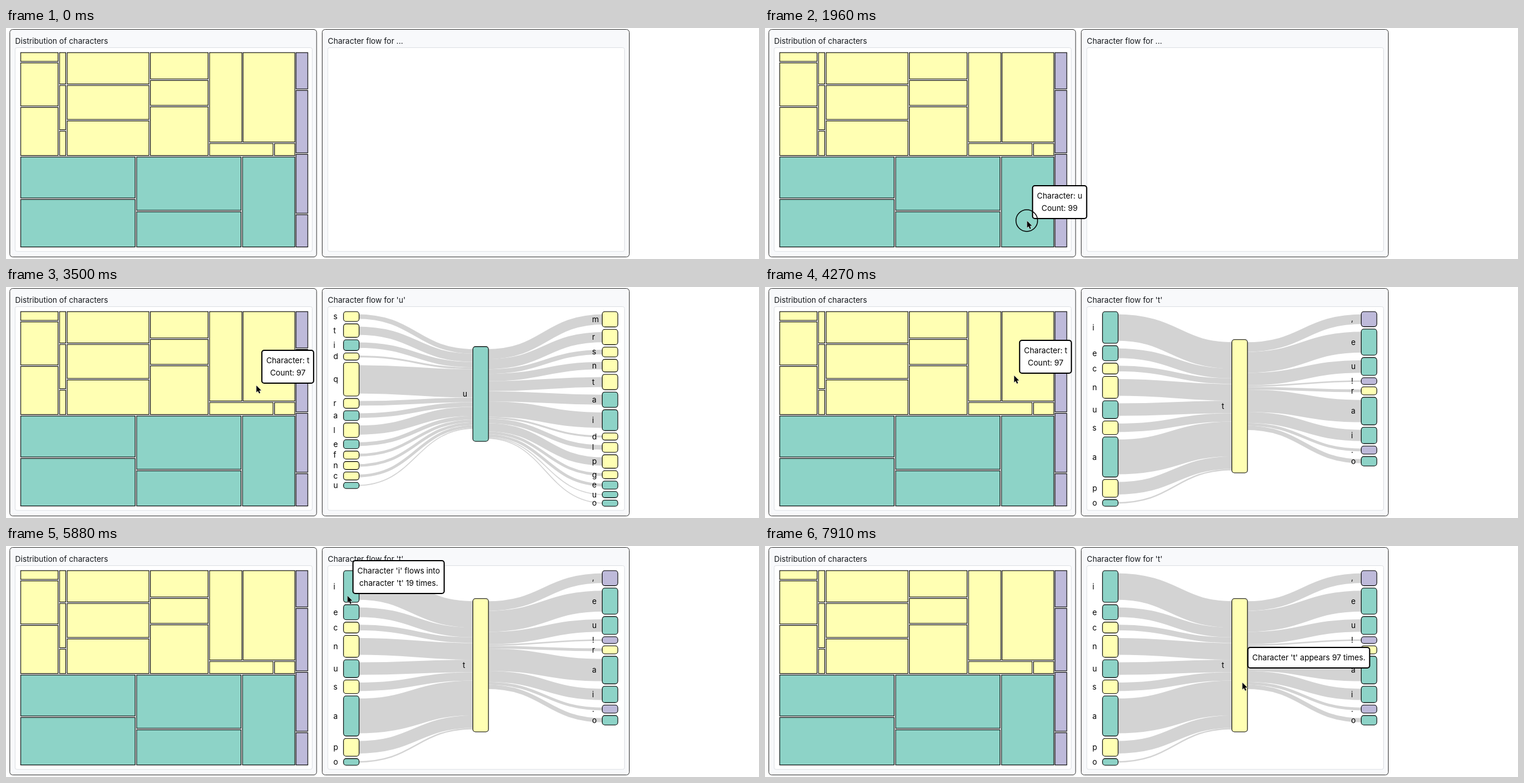
An HTML page that plays this animation: 1280x394 px, repeating every 8 s.

```html
<!DOCTYPE html>
<html lang="en">
<head>
<meta charset="utf-8">
<title>Character flow</title>
<style>
  html, body { margin: 0; width: 100%; height: 100%; overflow: hidden; background: #fff; }
  body { position: relative; font: 13.2px/21px Inter, Roboto, sans-serif; color: #000; }
  svg { position: absolute; left: 0; top: 0; width: 1280px; height: 394px; }
  .panel { fill: #f8f9fb; stroke: #333; }
  .plot { fill: #fff; stroke: #dcdfe3; }
  .title { fill: #15181c; }
  .cell, .node { stroke: #000; stroke-width: 1.1; }
  .link { fill: none; stroke: #d3d3d3; }
  #tip {
    position: absolute; left: 0; top: 0; padding: 6px 6.5px;
    border: 2px solid #000; border-radius: 5px; background: #fff;
    text-align: center; white-space: pre;
  }
</style>
</head>
<body>
<svg id="chart">
  <rect class="panel" x="6.5" y="2.5" width="521.5" height="388" rx="5"/>
  <rect class="plot" x="15.5" y="33.5" width="505" height="347.5" rx="3"/>
  <text class="title" x="15.5" y="27.3">Distribution of characters</text>
  <rect class="panel" x="537.5" y="2.5" width="522" height="388" rx="5"/>
  <rect class="plot" x="547" y="33.5" width="504.5" height="347.5" rx="3"/>
  <text class="title" id="heading" x="547" y="27.3"></text>
</svg>
<div id="tip"></div>
<svg>
  <circle id="ring" r="18.4" fill="none" stroke="#000" stroke-width="1.5"/>
  <path id="cursor" d="M0 0V11.8L2.7 9.3 4.6 13.7 6.6 12.9 4.8 8.6H8.4Z"
        fill="#000" stroke="#fff" stroke-width="1" paint-order="stroke"/>
</svg>
<script>
const LOOP = 8000, TICK = 70;
const YELLOW = '#ffffb3', TEAL = '#8dd3c7', PURPLE = '#bebada';
const byId = id => document.getElementById(id);
const chart = byId('chart'), heading = byId('heading'), tip = byId('tip');
const ring = byId('ring'), cursor = byId('cursor');

function add(parent, tag, attrs, text) {
  const el = document.createElementNS('http://www.w3.org/2000/svg', tag);
  for (const key in attrs) el.setAttribute(key, attrs[key]);
  if (text) el.textContent = text;
  return parent.appendChild(el);
}

function box(parent, cls, b, fill, rx) {
  add(parent, 'rect', { class: cls, x: b.x, y: b.y, width: b.w, height: b.h, rx, fill });
}

// Treemap columns: letters, fill, left, right, top, bottom edge of each cell
const COLUMNS = [
  ['vgd', YELLOW, 25, 88.5, 42, 57, 133, 217.5],
  ['xhj', YELLOW, 91, 101.5, 42, 95.5, 173.5, 217.5],
  ['nrs', YELLOW, 104, 243, 42, 95.5, 156, 217.5],
  ['pcl', YELLOW, 245.5, 343.5, 42, 87, 132, 217.5],
  ['m', YELLOW, 346, 401, 42, 194.5],
  ['t', YELLOW, 403, 491, 42, 194.5],
  ['b', YELLOW, 346, 454, 197, 217.5],
  ['f', YELLOW, 456.5, 491, 197, 217.5],
  ['ei', TEAL, 25, 219.5, 220, 290, 373.5],
  ['ao', TEAL, 222, 399.5, 220, 311, 373.5],
  ['u', TEAL, 402, 491, 220, 373.5],
  ['!.,?', PURPLE, 493, 513, 42, 104, 213, 316, 373.5]
];
const AREA_PER_COUNT = 138, CELL_GAP = 2.5;

const cells = COLUMNS.flatMap(([letters, fill, left, right, top, ...bottoms]) =>
  bottoms.map((bottom, i) => {
    const y = i ? bottoms[i - 1] + CELL_GAP : top;
    const cell = { x: left, y, w: right - left, h: bottom - y };
    box(chart, 'cell', cell, fill, 0);
    const count = Math.round(cell.w * cell.h / AREA_PER_COUNT);
    cell.tip = `Character: ${letters[i]}\nCount: ${count}`;
    return cell;
  }));

const TOP = 42, HEIGHT = 332, PAD = 9, GAP = 4.1, NODE_W = 26.5;
const LEFT_X = 573.7, MID_X = 793.6, RIGHT_X = 1013.5;
const colorOf = c => 'aeiou'.includes(c) ? TEAL : /[a-z]/.test(c) ? YELLOW : PURPLE;
const sum = list => list.reduce((a, b) => a + b, 0);

function makeFlow(char, total, midTop, sources, inCounts, targets, outCounts) {
  const group = add(chart, 'g', {});
  const links = add(group, 'g', {}), nodes = add(group, 'g', {});
  const most = Math.max(sum(inCounts), sum(outCounts));
  const full = sum(inCounts) === most ? inCounts : outCounts;
  const unit = (HEIGHT - full.length * PAD - (full.length - 1) * GAP) / most;
  const hits = [];

  function node(c, x, y, h, tipText) {
    const b = { x, y, w: NODE_W, h, tip: tipText };
    box(nodes, 'node', b, colorOf(c), 4.5);
    add(nodes, 'text', { x: x - 17.3, y: y + h / 2 + 4.6 }, c);
    hits.push(b);
  }

  function side(letters, counts, x, incoming) {
    let y = TOP, midY = midTop + PAD / 2;
    counts.forEach((n, i) => {
      const w = n * unit, c = letters[i];
      const outer = y + PAD / 2 + w / 2, inner = midY + w / 2;
      const [x0, y0, x1, y1] = incoming
        ? [x + NODE_W - 4.5, outer, MID_X + 4.5, inner]
        : [MID_X + NODE_W - 4.5, inner, x + 4.5, outer];
      const xm = (x0 + x1) / 2;
      add(links, 'path', { class: 'link', 'stroke-width': w,
        d: `M${x0} ${y0}C${xm} ${y0} ${xm} ${y1} ${x1} ${y1}` });
      const [from, to] = incoming ? [c, char] : [char, c];
      node(c, x, y, w + PAD, `Character '${from}' flows into\ncharacter '${to}' ${n} times.`);
      y += w + PAD + GAP;
      midY += w;
    });
  }

  side(sources, inCounts, LEFT_X, true);
  side(targets, outCounts, RIGHT_X, false);
  node(char, MID_X, midTop, most * unit + PAD, `Character '${char}' appears ${total} times.`);
  return { char, group, hits };
}

const flowU = makeFlow('u', 99, 101.6,
  'stidqralefncu', [5, 9, 6, 2, 31, 5, 5, 10, 4, 3, 3, 3, 1],
  'mrsntaidlpgeuo', [11, 11, 5, 8, 11, 11, 17, 2, 5, 9, 3, 3, 1, 1]);
const flowT = makeFlow('t', 97, 89.8,
  'iecnusapo', [19, 7, 4, 12, 9, 6, 25, 9, 1],
  ',eu!rai.o', [7, 15, 9, 1, 2, 16, 8, 2, 3]);

// Pointer moves: start, end, x, y
const START = [439, 396];
const MOVES = [
  [1120, 1750, 445.5, 329],
  [3010, 3780, 423.5, 151],
  [5040, 5880, 580.5, 85],
  [5880, 6020, 583, 82],
  [6860, 7560, 782, 250],
  [7560, 7700, 796, 233],
  [7700, 7770, 816, 230],
  [7770, 7910, 811.5, 233]
];
// Clicks: press, release, ring gone
const CLICKS = [[1960, 2100, 2310], [4130, 4130, 4270]];

function ease(p) {
  const u = p ** 0.75;
  return u < 0.5 ? 4 * u ** 3 : 1 - 4 * (1 - u) ** 3;
}

function pointerAt(t) {
  let [x, y] = START;
  for (const [start, end, toX, toY] of MOVES) {
    if (t <= start) break;
    const e = ease(Math.min(1, (t - start) / (end - start)));
    x += (toX - x) * e;
    y += (toY - y) * e;
  }
  return [x, y];
}

function ringOpacity(t) {
  const click = CLICKS.find(([press, , gone]) => t >= press && t < gone);
  if (!click) return 0;
  const [, release, gone] = click;
  return t <= release ? 1 : (gone - t) / (gone - release);
}

const show = (el, on) => { el.style.display = on ? '' : 'none'; };

function draw(time) {
  const t = Math.floor(time % LOOP / TICK) * TICK;
  const [x, y] = pointerAt(t);
  const flow = t >= 4200 ? flowT : t >= 2100 ? flowU : null;
  heading.textContent = 'Character flow for ' + (flow ? `'${flow.char}'` : '...');
  show(flowU.group, flow === flowU);
  show(flowT.group, flow === flowT);

  const active = t >= 1190;
  show(cursor, active);
  cursor.setAttribute('transform', `translate(${x} ${y})`);
  ring.setAttribute('transform', `translate(${x - 0.5} ${y - 0.5})`);
  ring.style.opacity = ringOpacity(t);

  const targets = flow ? cells.concat(flow.hits) : cells;
  const hit = active && targets.find(b =>
    x >= b.x && x <= b.x + b.w && y >= b.y && y <= b.y + b.h);
  show(tip, hit);
  if (hit) {
    tip.textContent = hit.tip;
    tip.style.transform = `translate(${x + 8.3}px, ${y - 61}px)`;
  }
}

let began;
function frame(now) {
  began ??= now;
  draw(now - began);
  requestAnimationFrame(frame);
}
draw(0);
requestAnimationFrame(frame);
</script>
</body>
</html>
```
